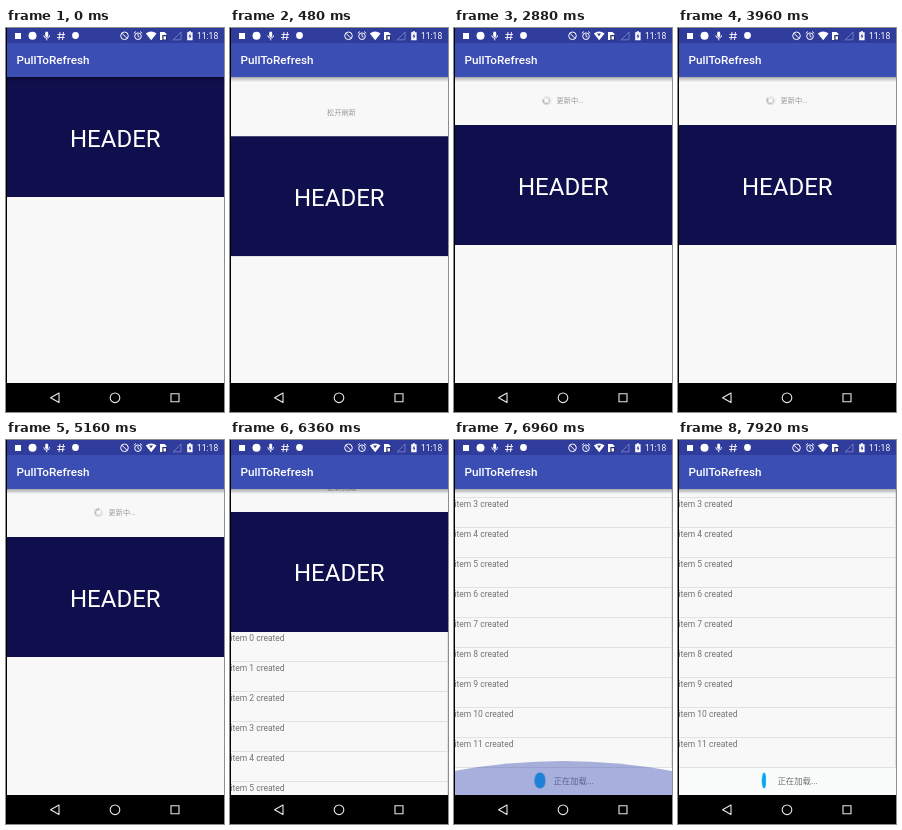
Recreate the animation shown at these times as an HTML page. Size 218 by 384 pixels, loop 8000 ms.

```html
<!DOCTYPE html>
<html lang="zh">
<head>
<meta charset="utf-8">
<title>Pull to refresh</title>
<style>
html, body { margin: 0; width: 100%; height: 100%; overflow: hidden; background: #000; }
svg { display: block; width: 100%; height: 100%; font-family: Roboto, "Noto Sans CJK SC", "Noto Sans CJK", sans-serif; }
.loop { animation: 8s linear infinite; }

#list { animation-name: scroll; }
@keyframes scroll {
  0%, 1.5% { transform: translateY(0); animation-timing-function: ease-in-out; }
  7.5%, 8.5% { transform: translateY(68px); animation-timing-function: ease-out; }
  11.5%, 76.5% { transform: translateY(48px); }
  79.5% { transform: translateY(23px); }
  82%, 83% { transform: translateY(0); animation-timing-function: ease-in; }
  86%, 100% { transform: translateY(-201px); }
}

.label { visibility: hidden; font-size: 7.2px; fill: #999; animation-timing-function: step-end; }
.hint { animation-name: hint; }
.release { animation-name: release; }
.busy { animation-name: busy; }
.done { animation-name: done; }
@keyframes hint { 0% { visibility: visible; } 6%, 100% { visibility: hidden; } }
@keyframes release { 0% { visibility: hidden; } 6% { visibility: visible; } 9%, 100% { visibility: hidden; } }
@keyframes busy { 0% { visibility: hidden; } 9% { visibility: visible; } 75%, 100% { visibility: hidden; } }
@keyframes done { 0% { visibility: hidden; } 75%, 100% { visibility: visible; } }

#spinner { animation: spin 1s steps(12) infinite; }
@keyframes spin { to { transform: rotate(360deg); } }

#coin {
  transform-box: fill-box; transform-origin: center;
  animation: flip 444.444ms cubic-bezier(.37, 0, .63, 1) -262ms infinite alternate;
}
@keyframes flip { from { transform: scaleX(1); } to { transform: scaleX(-1); } }

#glow { transform-origin: 109px 355px; animation-name: glow; }
@keyframes glow {
  0%, 85.5% { opacity: 0; transform: scaleY(.3); }
  86.7%, 88% { opacity: .44; transform: scaleY(1); animation-timing-function: ease-out; }
  94.5%, 100% { opacity: 0; transform: scaleY(.4); }
}

#traffic { animation-name: traffic; animation-timing-function: step-end; }
@keyframes traffic {
  0% { visibility: hidden; }
  27% { visibility: visible; }
  48% { visibility: hidden; }
  64.5% { visibility: visible; }
  90%, 100% { visibility: hidden; }
}
</style>
</head>
<body>
<svg viewBox="0 0 218 384">
  <defs>
    <linearGradient id="shade" x2="0" y2="1">
      <stop stop-opacity=".32"/>
      <stop offset="1" stop-opacity="0"/>
    </linearGradient>
    <clipPath id="page"><path d="M0 49H218V355H0Z"/></clipPath>
  </defs>

  <path fill="#f8f8f8" d="M0 49H218V355H0Z"/>
  <g clip-path="url(#page)">
    <g id="list" class="loop">
      <g transform="translate(0 49)">
        <g text-anchor="middle">
          <text class="label hint loop" x="111.5" y="-21.7">下拉刷新</text>
          <text class="label release loop" x="111.5" y="-21.7">松开刷新</text>
          <text class="label done loop" x="111.5" y="-21.7">更新完成</text>
        </g>
        <g class="label busy loop">
          <g transform="translate(92.5 -24.5)"><g id="spinner" stroke="#777" stroke-width=".9"></g></g>
          <text x="102.5" y="-21.7">更新中...</text>
        </g>
        <path fill="#100f4e" d="M0 0H218V120H0Z"/>
        <text x="109.3" y="69.5" font-size="24" fill="#fff" text-anchor="middle">HEADER</text>
        <g class="label done loop">
          <g id="items" font-size="8.5" fill="#737373"></g>
          <path fill="#fafbfb" d="M0 480H218V507H0Z"/>
          <ellipse id="coin" cx="86" cy="492.5" rx="8" ry="8" fill="#06a7f0"/>
          <text x="99.5" y="495.7" font-size="8.4" fill="#737373">正在加载...</text>
        </g>
      </g>
    </g>
    <path id="glow" class="loop" fill="#3f51b5" d="M0 331Q109 311 218 331V355H0Z"/>
    <path fill="url(#shade)" d="M0 49H218V54H0Z"/>
  </g>

  <path fill="#303c9c" d="M0 0H218V15H0Z"/>
  <path fill="#3b4eb3" d="M0 15H218V49H0Z"/>
  <text x="10.5" y="36.2" font-size="11.7" font-weight="500" fill="#fff">PullToRefresh</text>

  <g fill="#fff">
    <rect x="9" y="5" width="6" height="6"/>
    <circle cx="26.5" cy="7.8" r="4"/>
    <rect x="39.2" y="3.5" width="3" height="5.4" rx="1.5"/>
    <path fill="none" stroke="#fff" stroke-width=".9" d="M37.8 7.2a2.9 2.9 0 0 0 5.8 0M40.7 10V12.3"/>
    <path fill="none" stroke="#fff" stroke-width=".9" d="M54 4L53 12M57.5 4L56.5 12M51.5 6.5H59M51 9.5H58.5"/>
    <circle cx="69.5" cy="7.5" r="3.4"/>
    <g fill="none" stroke="#fff">
      <circle cx="118.5" cy="7.8" r="3.8"/>
      <path d="M115.8 5.1L121.2 10.5"/>
      <circle cx="132" cy="8.2" r="3.3"/>
      <path stroke-width=".9" d="M132 6V8.4L133.6 9.3M127.8 5.2L130 3.5M136.2 5.2L134 3.5"/>
    </g>
    <path d="M139.8 5.4Q145.2 1.8 150.6 5.4L145.2 12.2Z"/>
    <path id="traffic" class="loop" fill="#303c9c" d="M143 5.5H147L145 8.2Z"/>
    <path d="M154 4H158.5L160.5 6V12H154Z"/>
    <path fill="#252d6b" d="M156.3 7H161V12.5H156.3Z"/>
    <path d="M157.5 8.2H160V11.5H157.5Z"/>
    <path fill="none" stroke="#7f88c8" stroke-width=".8" d="M175 4V11.8H167.2Z"/>
    <path d="M181.2 4.2H182.8V3.3H185V4.2H186.6V12.2H181.2Z"/>
    <path fill="#303c9c" d="M184.5 5.3L182.5 8.6H183.7V11L185.4 7.7H184.3Z"/>
    <text x="191" y="11" font-size="8.5">11:18</text>
  </g>

  <path d="M0 355H218V384H0ZM0 0H1V384H0Z"/>
  <g fill="none" stroke="#e8e8e8" stroke-width="1.1">
    <path stroke-linejoin="round" d="M53 365V374.6L44.6 369.8Z"/>
    <circle cx="109" cy="369.8" r="4.8"/>
    <path d="M165 365.8H173V373.8H165Z"/>
  </g>
</svg>
<script>
const repeat = (count, draw) => Array.from({ length: count }, (_, i) => draw(i)).join('');

document.getElementById('items').innerHTML = repeat(12, i => `
  <g transform="translate(0 ${120 + 30 * i})">
    <text x=".4" y="9">item ${i} created</text>
    <path fill="#e2e2e2" d="M0 29H218V30H0ZM217 0H218V30H217Z"/>
  </g>`);

document.getElementById('spinner').innerHTML = repeat(12, i =>
  `<path d="M0 -2.4V-4.3" transform="rotate(${30 * i})" opacity="${0.2 + 0.065 * i}"/>`);
</script>
</body>
</html>
```
